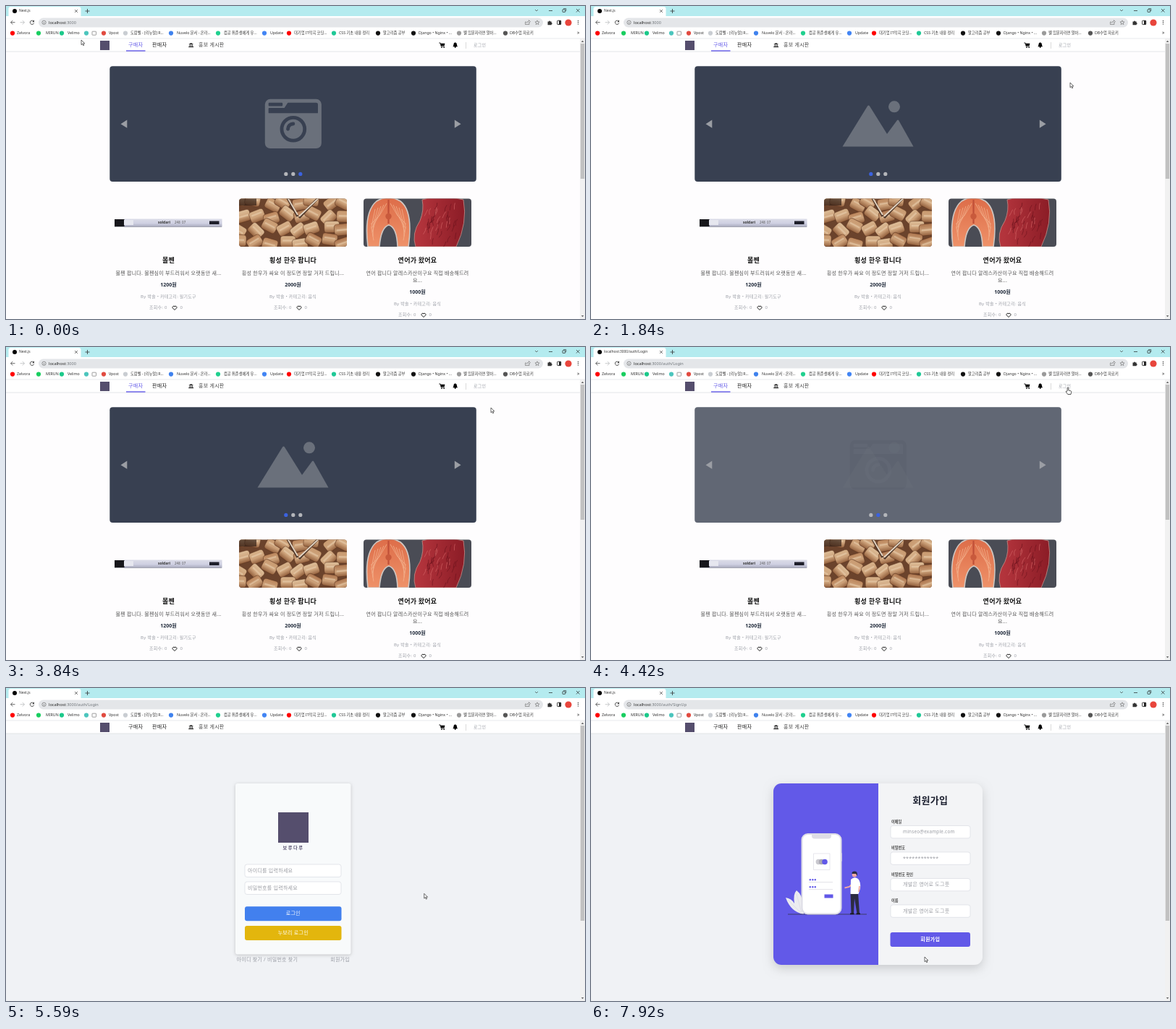
An HTML page with a canvas that plays this animation: 800 px wide and 433 px high, repeating every 8 s.

```html
<!DOCTYPE html>
<html lang="ko">
<head>
<meta charset="utf-8">
<title>Shop demo</title>
<style>
html, body { margin: 0; width: 100%; height: 100%; overflow: hidden; background: #fefdfe; }
canvas { display: block; }
</style>
</head>
<body>
<canvas id="stage" width="800" height="433"></canvas>
<script>
const ctx = document.getElementById('stage').getContext('2d');
const LOOP = 8000, STEP = 1000 / 12;
const LOGIN_AT = 4580, LOADED_AT = 4830, SIGNUP_AT = 6995;
const LOGO = '#554e6d', INDIGO = '#6259e8', INK = '#222', MUTED = '#9b9ea6';

// time, x, y of the pointer tip
const POINTER = [
  [0, 104, 47], [420, 330, 130], [840, 640, 215], [1250, 744, 169], [1500, 759, 140],
  [1833, 662, 106], [2500, 250, 294], [2833, 600, 55], [3170, 655, 57], [3420, 701, 113],
  [3590, 670, 84], [3840, 670, 84], [4170, 658, 56], [4990, 658, 56], [5250, 744, 130],
  [5750, 520, 338], [6250, 430, 375], [6580, 430, 375], [6830, 462, 371], [8000, 461, 372]
];

const clamp = v => Math.max(0, Math.min(1, v));
const smooth = v => { v = clamp(v); return v * v * (3 - 2 * v); };
const random = seed => () => (seed = seed * 16807 % 2147483647) / 2147483647;

function rect(x, y, w, h, color) {
  ctx.fillStyle = color;
  ctx.fillRect(x, y, w, h);
}

function box(x, y, w, h, r, fill, stroke, lw = 0.7) {
  ctx.beginPath();
  ctx.roundRect(x, y, w, h, r);
  if (fill) { ctx.fillStyle = fill; ctx.fill(); }
  if (stroke) { ctx.strokeStyle = stroke; ctx.lineWidth = lw; ctx.stroke(); }
}

function disc(x, y, r, color) {
  ctx.beginPath();
  ctx.arc(x, y, r, 0, 7);
  ctx.fillStyle = color;
  ctx.fill();
}

function poly(points, color) {
  ctx.beginPath();
  points.forEach(([x, y]) => ctx.lineTo(x, y));
  ctx.closePath();
  ctx.fillStyle = color;
  ctx.fill();
}

function line(points, color, width = 0.8) {
  ctx.beginPath();
  points.forEach(([x, y], i) => i ? ctx.lineTo(x, y) : ctx.moveTo(x, y));
  ctx.strokeStyle = color;
  ctx.lineWidth = width;
  ctx.stroke();
}

function shape(path, fill, stroke, width = 0.8) {
  const p = new Path2D(path);
  if (fill) { ctx.fillStyle = fill; ctx.fill(p); }
  if (stroke) { ctx.strokeStyle = stroke; ctx.lineWidth = width; ctx.stroke(p); }
}

function at(x, y, draw, scale = 1) {
  ctx.save();
  ctx.translate(x, y);
  ctx.scale(scale, scale);
  draw();
  ctx.restore();
}

function clipBox(x, y, w, h, r, draw) {
  ctx.save();
  ctx.beginPath();
  ctx.roundRect(x, y, w, h, r);
  ctx.clip();
  draw();
  ctx.restore();
}

function shadowed(blur, color, dy, draw) {
  ctx.save();
  ctx.shadowBlur = blur;
  ctx.shadowColor = color;
  ctx.shadowOffsetY = dy;
  draw();
  ctx.restore();
}

function text(str, x, y, size, color = INK, align = 'left', weight = 400, spacing = 0.25) {
  ctx.font = `${weight} ${size}px "Noto Sans", "Noto Sans CJK KR", "Noto Sans CJK", sans-serif`;
  ctx.letterSpacing = spacing + 'px';
  ctx.textAlign = align;
  ctx.textBaseline = 'middle';
  ctx.fillStyle = color;
  ctx.fillText(str, x, y);
  return ctx.measureText(str).width;
}
const ui = (str, x, y, size, color) => text(str, x, y, size, color, 'left', 400, 0);

const BOOKMARKS = [
  [9, 15, '#f00', 'Zelvora'], [45, 55, '#19ce60', 'MIRUN'], [77, 85, '#1cc98a', 'Velimo'],
  [111, 0, '#4cc5bd', ''], [135, 142, '#e14b40', 'Vpost'],
  [165, 172, '#c9cdd2', '도람벨 - [리뉴얼] R...'], [228, 236, '#3f82ee', 'Nuvelo 문서 - 온라...'],
  [293, 301, '#20d08f', '컴공 취준생에게 유...'], [357, 365, '#4285f4', 'Update'],
  [391, 398, '#f00', '대기업 IT작곡 코딩...'], [453, 460, '#20c997', 'CSS 기초 내용 정리'],
  [514, 521, '#111', '알고리즘 공부'], [563, 570, '#111', 'Django • Nginx • ...'],
  [626, 632, '#9a9a9a', '웰 입문자라면 알아...'], [690, 696, '#555', 'DB수업 자료키']
];

function browser(t) {
  rect(0, 0, 800, 14, '#b4ebef');
  box(3.5, 1, 100, 15, 3, '#fff');
  rect(0, 14, 800, 31, '#fff');
  disc(12, 7, 3, '#000');
  const loading = t >= 4240 && t < LOADED_AT;
  ui(loading ? 'localhost:3000/auth/Login' : 'Next.js', 18, 7, 4.9, '#333');
  line([[95, 5], [99, 9]], '#444', 0.7);
  line([[99, 5], [95, 9]], '#444', 0.7);
  line([[109.5, 7], [115.5, 7]], '#333');
  line([[112.5, 4], [112.5, 10]], '#333');

  line([[731, 5], [733, 7], [735, 5]], '#444', 0.7);
  line([[750, 6.5], [755, 6.5]], '#222', 0.7);
  box(769, 4.8, 3.6, 3.6, 0.4, null, '#222');
  line([[770.2, 3.6], [773.8, 3.6], [773.8, 7.2]], '#222', 0.6);
  line([[788, 4], [792.5, 8.5]], '#222', 0.7);
  line([[792.5, 4], [788, 8.5]], '#222', 0.7);

  line([[12.5, 22.7], [6.5, 22.7]], '#444');
  line([[9.3, 20], [6.5, 22.7], [9.3, 25.4]], '#444');
  line([[19.5, 22.7], [25.5, 22.7]], '#b9bbbe');
  line([[22.7, 20], [25.5, 22.7], [22.7, 25.4]], '#b9bbbe');
  shape('M38.2 21.2A2.7 2.7 0 1 0 38.6 23.5', null, '#444', 0.9);
  poly([[39, 19.3], [39, 22.2], [36.2, 22.2]], '#444');

  box(45, 16.5, 697, 13, 6.5, '#e4e6e9');
  ctx.beginPath();
  ctx.arc(52.5, 22.8, 2.6, 0, 7);
  ctx.strokeStyle = '#555';
  ctx.lineWidth = 0.6;
  ctx.stroke();
  line([[52.5, 22.4], [52.5, 24.2]], '#555', 0.7);
  const path = t >= SIGNUP_AT ? '/auth/SignUp' : t >= 4240 ? '/auth/Login' : '';
  const host = ui('localhost', 59, 23, 5.6, '#222');
  ui(':3000' + path, 59 + host, 23, 5.6, '#70757a');
  shape('M719 22h-1.5v3.5h5.5v-2M719.5 24q0-3 3-3l0-1.4 2 2-2 2v-1.2', null, '#666', 0.6);
  star(734, 23);
  shape('M748.5 21.5h1.6a1 1 0 0 1 2 0h1.6v1.8a1 1 0 0 1 0 2v1h-5.2z', '#333');
  box(761.7, 20.2, 5, 5.4, 0.6, null, '#222', 0.9);
  rect(764, 20.2, 2.7, 5.4, '#222');
  disc(777, 23, 4.6, '#e8453c');
  [20.5, 22.8, 25.1].forEach(y => disc(790.5, y, 0.7, '#333'));

  for (const [x, tx, color, label] of BOOKMARKS) {
    disc(x, 37.6, 3.1, color);
    if (label) ui(label, tx, 37.7, 5.25, '#333');
  }
  box(119, 35.2, 5.5, 5, 0.6, null, '#777');
  ui('»', 789, 37, 6.5, '#333');
}

function star(x, y) {
  ctx.beginPath();
  for (let i = 0; i < 10; i++) {
    const r = i % 2 ? 1.4 : 3.2, a = -Math.PI / 2 + i * Math.PI / 5;
    ctx.lineTo(x + r * Math.cos(a), y + r * Math.sin(a));
  }
  ctx.closePath();
  ctx.strokeStyle = '#666';
  ctx.lineWidth = 0.6;
  ctx.stroke();
}

function header(t) {
  const welcome = t >= LOGIN_AT && t < LOADED_AT;
  rect(0, 45, 793, 18, '#fff');
  rect(0, 44.6, 800, 0.7, '#dfe1e5');
  rect(0, 62.6, 793, 0.8, '#dcdee2');
  if (!welcome) rect(130, 48, 13, 13, LOGO);
  const home = t < LOGIN_AT;
  text('구매자', 169, 54, 7, home ? INDIGO : INK);
  if (home) rect(166, 61.3, 26.5, 1.4, INDIGO);
  text('판매자', 202, 54, 7);
  poly([[252.3, 53], [255.7, 50.9], [259.1, 53]], '#222');
  [253.3, 255.2, 257.1].forEach(x => rect(x, 53.4, 1, 2.4, '#222'));
  rect(252.3, 56, 6.8, 1.1, '#222');
  text('홍보 게시판', 266, 54, 7, '#444');
  const x = welcome ? 507 : 602.5;
  at(x, 54.2, cart, 0.92);
  at(x + 18.2, 54.2, bell, 0.95);
  if (welcome) {
    text('님 환영합니다', 559, 54, 7);
    box(609, 46, 53, 15, 7.5, '#dc3545');
    shape('M619 51h3.2v1.3l2 1.4-2 1.5v1.7h-3.2z', '#fff');
    text('로그아웃', 628, 54, 6, '#fff', 'left', 700);
  } else {
    rect(635, 50, 0.7, 9, '#ccc');
    text('로그인', 646, 54, 6, MUTED);
  }
}

function cart() {
  shape('M-4.5-3.4h1.9l1.4 5.4h5', null, '#000', 1);
  poly([[-2.4, -2.6], [4.3, -2.6], [3.4, 1], [-1.5, 1]], '#000');
  disc(-0.7, 3.3, 0.9, '#000');
  disc(3, 3.3, 0.9, '#000');
}

function bell() {
  shape('M-3.6 2.2Q-2.4 1-2.4-1A2.4 2.6 0 0 1 2.4-1Q2.4 1 3.6 2.2z', '#000');
  disc(0, 2.8, 1.1, '#000');
  rect(-0.4, -4.3, 0.8, 1.2, '#000');
}

function camera() {
  const p = new Path2D();
  p.roundRect(0, 32, 512, 448, 48);
  p.roundRect(32, 64, 128, 32, 8);
  p.addPath(new Path2D('M38 160q-6 0-6-6v-36q0-6 6-6h138l30-45q2-3 5-3h253q16 0 16 16v74q0 6-6 6z'));
  for (const r of [120, 88]) {
    p.moveTo(256 + r, 304);
    p.arc(256, 304, r, 0, 2 * Math.PI);
  }
  p.addPath(new Path2D('M208 320a16 16 0 0 1-16-16a64 64 0 0 1 64-64a16 16 0 0 1 0 32a32 32 0 0 0-32 32a16 16 0 0 1-16 16z'));
  ctx.fillStyle = '#6a707b';
  ctx.fill(p, 'evenodd');
}

function slide(kind, alpha) {
  if (alpha <= 0) return;
  ctx.save();
  ctx.globalAlpha = alpha;
  box(143.3, 83.3, 506.5, 159.7, 4, '#384051');
  if (kind === 'camera') at(357.8, 123.9, camera, 0.1525);
  else {
    shape('M347.5 194.5L382 138.5q1.5-2 3 0L409 177l14-19q1-1 2 0L445.5 194.5z', '#6a707b');
    disc(419, 139.3, 8, '#6a707b');
  }
  ctx.restore();
}

// the leaving slide stays on top while it fades
function crossfade(from, to, p) {
  slide(to, p);
  slide(from, 1 - p);
}

function carousel(t) {
  if (t < 4150) crossfade('camera', 'hills', smooth((t - 1150) / 500));
  else crossfade('hills', 'camera', smooth((t - 4150) / 420));
  poly([[158.5, 163.2], [167.3, 157.6], [167.3, 168.8]], '#9b9ea4');
  poly([[628.6, 163.2], [619.8, 157.6], [619.8, 168.8]], '#9b9ea4');
  const active = t < 1150 ? 2 : t < 4150 ? 0 : 1;
  for (let i = 0; i < 3; i++) disc(386.8 + i * 10, 232.4, 2.6, i === active ? '#3b62e0' : '#b4b6ba');
}

function pen() {
  const g = ctx.createLinearGradient(0, 294, 0, 306);
  g.addColorStop(0, '#dcdde8');
  g.addColorStop(0.55, '#cfd0e2');
  g.addColorStop(1, '#a3a5b8');
  rect(163, 294.5, 135.5, 11, g);
  rect(150, 295, 13.5, 10, '#17171b');
  rect(163, 296, 13, 7, '#e6e7ef');
  rect(281, 297.5, 13.5, 4.5, '#1e1f2a');
  rect(150, 305.3, 148, 0.6, '#8a8b98');
  text('soldari', 210, 300, 5, '#333', 'left', 700, 0);
  ui('248  07', 233, 300, 4.5, '#555');
}

function grilledMeat() {
  rect(322, 266, 149, 67, '#6b432c');
  const rnd = random(23), tones = ['#c89a70', '#d8b48c', '#b98258', '#e0c29d', '#a97049'];
  for (let i = 0; i < 32; i++) {
    const x = 326 + (i % 8) * 20 + rnd() * 10 - 5, y = 272 + Math.floor(i / 8) * 18 + rnd() * 8 - 4;
    const g = ctx.createLinearGradient(0, -9, 0, 9);
    g.addColorStop(0, tones[Math.floor(rnd() * 5)]);
    g.addColorStop(0.55, '#cda27a');
    g.addColorStop(1, '#8b5735');
    ctx.save();
    ctx.translate(x, y);
    ctx.rotate(rnd() * 1.6 - 0.8);
    box(-11, -8, 21, 16, 4, g, 'rgba(92,52,30,.55)', 1);
    rect(-8, -4 + rnd() * 3, 15, 2.4, 'rgba(238,214,182,.5)');
    ctx.restore();
  }
  rect(322, 266, 24, 10, 'rgba(50,32,24,.7)');
  for (const [x0, x1, y1] of [[389, 403, 291], [431, 405, 293]]) {
    line([[x0, 266], [x1, y1]], '#4a3326', 3.2);
    line([[x0 + 0.5, 266], [x1, y1 - 2]], '#e5d6c4', 1.8);
  }
}

function salmonAndBeef() {
  rect(494, 266, 149, 67, '#4a4c55');
  const fish = ctx.createLinearGradient(0, 266, 0, 333);
  fish.addColorStop(0, '#dd6d49');
  fish.addColorStop(1, '#ef9269');
  shape('M500 333Q494 285 512 270Q528 260 545 270Q563 284 556 333L541 333Q540 306 529 303Q518 306 516 333z', fish, '#cfc8c3', 1.6);
  for (let i = 0; i < 5; i++) {
    const d = i * 4;
    for (const side of [-1, 1]) {
      const bend = (dx, y) => [528.5 + side * dx, y];
      line([bend(2.5 + d, 273 + d * 0.5), bend(12.5 + d * 0.7, 290 + d), bend(24.5 - i, 302 + d * 1.4)], '#f3b08c', 0.8);
    }
  }
  line([[528.5, 268], [528.5, 301]], '#c04f38', 2.2);
  disc(528.5, 291, 4.2, '#c95a3c');
  const beef = ctx.createLinearGradient(570, 0, 634, 0);
  beef.addColorStop(0, '#b3343c');
  beef.addColorStop(1, '#8b1c26');
  shape('M575 268Q600 260 632 268Q638 300 622 333L566 333Q560 315 572 297Q578 282 575 268z', beef, '#bd8580', 0.9);
  const rnd = random(5);
  for (let i = 0; i < 42; i++) {
    const x = 580 + rnd() * 44, y = 270 + rnd() * 56;
    line([[x, y], [x - 3 + rnd() * 3, y + 4], [x - 5 + rnd() * 5, y + 9]], i % 3 ? 'rgba(105,18,28,.6)' : 'rgba(215,105,105,.6)', 1);
  }
}

function product(cx, title, lines, price, category) {
  text(title, cx, 352, 9, '#111', 'center', 700);
  lines.forEach((str, i) => text(str, cx, 370 + i * 10, 7, '#555', 'center'));
  const y = 376 + lines.length * 10;
  text(price, cx, y, 7, '#222c3c', 'center', 700, 0);
  text('By 박솔 • 카테고리: ' + category, cx, y + 16.3, 6, MUTED, 'center');
  text('조회수: 0', cx - 26.5, y + 31.5, 6, MUTED);
  at(cx + 8.5, y + 31.5, heart);
  text('0', cx + 16, y + 31.5, 6, MUTED);
}

function heart() {
  shape('M0 3L-2.8.2A1.8 1.8 0 0 1 0-1.9A1.8 1.8 0 0 1 2.8.2z', '#fff', '#111', 0.95);
}

function homePage(t) {
  rect(0, 45, 793, 388, '#fefdfe');
  carousel(t);
  pen();
  clipBox(322, 266.5, 149, 66.5, 4, grilledMeat);
  clipBox(494, 266.5, 149, 66.5, 4, salmonAndBeef);
  product(224.5, '볼펜', ['볼펜 팝니다. 볼펜심이 부드러워서 오랫동안 새...'], '1200원', '필기도구');
  product(396.5, '횡성 한우 팝니다', ['횡성 한우가 싸요 이 정도면 정말 거저 드립니...'], '2000원', '음식');
  product(568.5, '연어가 왔어요', ['연어 팝니다 알레스카산이구요 직접 배송해드려', '요...'], '1000원', '음식');
}

function field(x, y, w, h, hint, hx, size = 7) {
  box(x, y, w, h, 3, '#fff', '#d9dce2');
  text(hint, hx, y + h / 2, size, '#9a9ca3');
}

function button(x, y, w, label, color, weight = 400) {
  box(x, y, w, 20, 3, color);
  text(label, x + w / 2, y + 10, 7, '#fff', 'center', weight);
}

function loginPage(t) {
  const loaded = t >= LOADED_AT, d = loaded ? 5 : 0;
  rect(0, 45, 793, 388, '#f0f2f5');
  shadowed(4, 'rgba(0,0,0,.2)', 1, () => box(317, 137 - d, 159.5, 226.5 + 2 * d, 3, '#f8fafb'));
  if (loaded) {
    rect(376, 172, 42, 42, LOGO);
    text('보루다루', 397, 221, 6.2, LOGO, 'center', 700, 1.5);
  }
  field(330, 239 + d, 133, 17.5, '아이디를 입력하세요', 334);
  field(330, 263 + d, 133, 17.5, '비밀번호를 입력하세요', 334);
  button(330, 297.3 + d, 133.5, '로그인', '#4280ee');
  button(330, 324 + d, 133.5, '누보리 로그인', '#e3b60d');
  text('아이디 찾기 / 비밀번호 찾기', 318.5, 370.5 + d, 7, MUTED);
  text('회원가입', 475, 370.5 + d, 7, MUTED, 'right');
}

function illustration() {
  shape('M294 313Q276 310 269 290Q277 291 281 298Q279 285 284 280Q292 286 293 300z', '#ececf0');
  line([[284, 285], [291, 311]], '#d4d3dd', 0.5);
  line([[272, 293], [290, 311]], '#d4d3dd', 0.5);
  line([[272, 313], [381, 313]], '#34334b', 0.8);
  box(344, 228, 2.6, 12, 1, '#dcdbe3');
  box(291.5, 202, 54, 110.5, 8, '#fff', '#dedde6', 2);
  box(305, 202, 27, 6.5, [0, 0, 4, 4], '#dedde6');
  box(307.5, 229, 22.5, 22.5, 0, null, '#dedde6');
  disc(314.3, 240.5, 3.7, '#c9c8cf');
  disc(318.5, 240.5, 3.7, '#aaa9b3');
  disc(323, 240.5, 3.8, INDIGO);
  for (const y of [265.3, 275.3]) {
    for (let i = 0; i < 3; i++) disc(302.8 + i * 3.5, y, 1.2, INDIGO);
    rect(301, y + 3.2, 33, 0.6, '#cfced8');
  }
  rect(322.5, 285.5, 12, 5, INDIGO);

  poly([[358.5, 283], [369, 283], [371, 312], [367.5, 312], [364, 291], [363, 312], [359.5, 312]], '#2c2b42');
  rect(358, 311.5, 5.5, 1.7, '#17161f');
  rect(366.5, 311.5, 5.5, 1.7, '#17161f');
  line([[361, 271], [357, 275], [350.5, 276.5]], '#f0a8a4', 1.8);
  shape('M359 265Q364 260 369 264Q373 268 372 277L369.5 285H358.5z', '#fff');
  line([[371, 274], [370, 282]], '#f0a8a4', 1.8);
  disc(364, 258.3, 3.2, '#f0a8a4');
  shape('M360.5 257Q360 253.5 364.5 253.5Q369 254 367.7 260L366 257z', '#2c2b42');
}

function signupPage() {
  rect(0, 45, 793, 388, '#f0f2f5');
  shadowed(14, 'rgba(0,0,0,.16)', 5, () => box(252, 132, 289, 251, 11, '#f3f4f6'));
  box(252, 132, 145, 251, [11, 0, 0, 11], INDIGO);
  illustration();
  text('회원가입', 468.7, 156, 13, '#1c2030', 'center', 700);
  [
    ['이메일', 'minseo@example.com', 6.3], ['비밀번호', '************', 7],
    ['비밀번호 확인', '개발은 영어로 도그풋', 7], ['이름', '개발은 영어로 도그풋', 7]
  ].forEach(([label, hint, size], i) => {
    const y = 190.5 + i * 36.5;
    text(label, 415, y - 5.3, 5.2, '#444', 'left', 600, 0);
    field(414, y, 110, 17.3, hint, 431, size);
  });
  button(413.5, 338, 110.5, '회원가입', INDIGO, 700);
}

function scrollbar(end) {
  rect(793, 45, 7, 388, '#f1f1f1');
  rect(793.8, 52, 5.4, end - 52, '#c1c1c1');
  poly([[794.8, 50], [798.4, 50], [796.6, 47.8]], '#666');
  poly([[794.8, 428], [798.4, 428], [796.6, 430.2]], '#666');
}

function pointer(t) {
  const i = Math.max(1, POINTER.findIndex(k => k[0] > t));
  const [t0, x0, y0] = POINTER[i - 1], [t1, x1, y1] = POINTER[i];
  const k = smooth((t - t0) / (t1 - t0));
  const x = x0 + (x1 - x0) * k, y = y0 + (y1 - y0) * k;
  const hand = (t >= 4100 && t < 5000) || (t >= 6750 && t < SIGNUP_AT);
  if (hand) at(x, y, () => shape('M.1 5V1a.9.9 0 0 1 1.8 0v3l3 .7q1 .4.8 1.6l-.7 3.2h-4.2l-2.6-3.6q0-1.2 1.2-.6z', '#fff', '#111', 0.7));
  else at(x, y, () => shape('M0 0V7.6L1.8 6L3 8.8L4.3 8.2L3.1 5.5H5.4z', '#fff', '#111', 0.7), 0.88);
}

function frame(now) {
  const t = Math.floor((now % LOOP) / STEP + 0.01) * STEP + 0.5;
  ctx.clearRect(0, 0, 800, 433);
  if (t < LOGIN_AT) homePage(t);
  else if (t < SIGNUP_AT) loginPage(t);
  else signupPage();
  browser(t);
  header(t);
  scrollbar(t < LOGIN_AT ? 239 : 322);
  pointer(t);
}

const start = performance.now();
function tick() {
  frame(performance.now() - start);
  requestAnimationFrame(tick);
}
tick();
</script>
</body>
</html>
```
